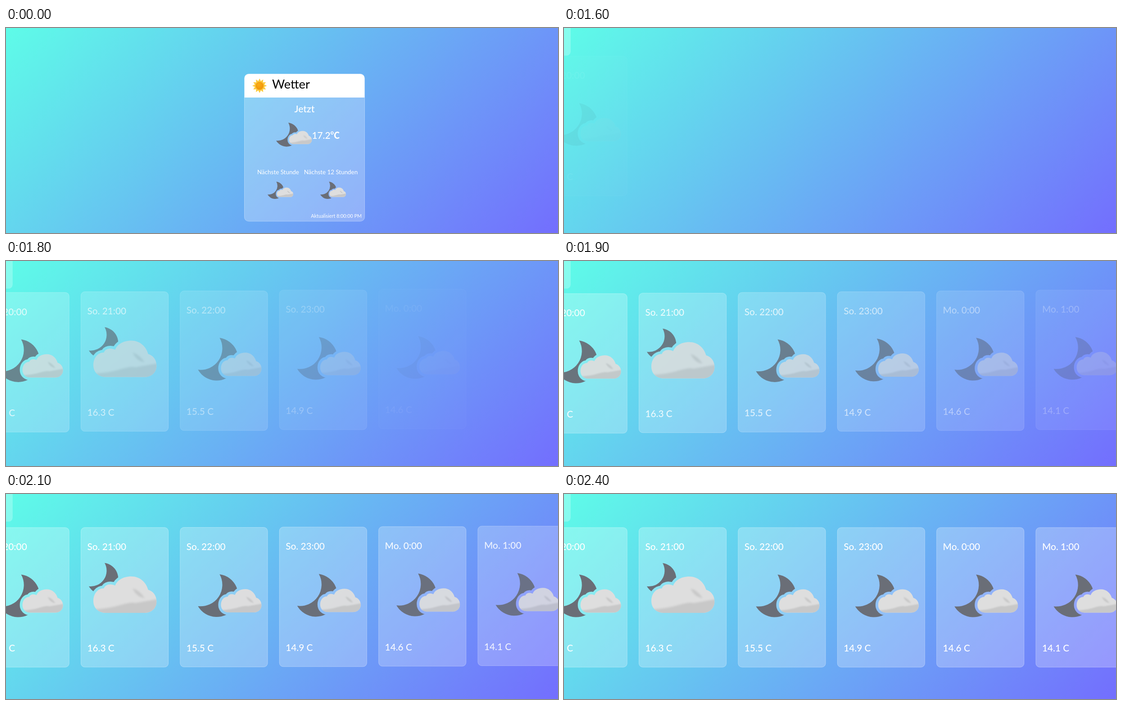
Write an HTML page that moves like this. It is 1226 px wide and 457 px high and loops after 4100 ms.

```html
<!DOCTYPE html>
<html lang="de">
<head>
<meta charset="utf-8">
<title>Wetter</title>
<style>
  html, body { margin: 0; width: 100%; height: 100%; overflow: hidden; }
  body { background: linear-gradient(135deg, #5efce8, #736efe); }
  svg { display: block; width: 1226px; height: 457px; }
  text { font-family: Lato, Carlito, sans-serif; fill: #fff; }
  .pane { fill: rgba(255, 255, 255, .25); }
  .edge { fill: none; stroke: rgba(255, 255, 255, .25); }
  .big { font-size: 20.8px; font-weight: 500; }
  .small { font-size: 13.4px; text-anchor: middle; }
  .unit { font-family: "Noto Sans CJK JP", "Noto Sans CJK SC", "Noto Sans CJK", Lato, sans-serif; font-weight: 700; }
</style>
</head>
<body>
<svg viewBox="0 0 1226 457">
  <defs>
    <path id="cloud" d="M18 52C7 52 0 45 0 35C0 25 6 17 15 17C17 11 25 10 31 13C34 5 43 0 54 0C66 0 75 8 78 19C85 21 90 27 90 36C90 45 83 52 73 52Z"/>
    <path id="moon" d="M48 0A47.8 47.8 0 1 1 0 71A48 48 0 0 0 48 0Z" fill="#6a6e77"/>
    <clipPath id="cloudClip"><use href="#cloud"/></clipPath>
    <filter id="soft" x="-20%" y="-50%" width="140%" height="200%"><feGaussianBlur stdDeviation="1.5"/></filter>
    <g id="shadedCloud">
      <use href="#cloud" fill="#dedede"/>
      <g clip-path="url(#cloudClip)">
        <g filter="url(#soft)" fill="#c8c8c8">
          <path d="M0 47Q22 46 38 41T60 38L94 32V58H0Z"/>
          <path d="M56 17Q66 20 73 31Q61 29 56 17Z"/>
        </g>
      </g>
    </g>
    <mask id="partlyGap" maskUnits="userSpaceOnUse" x="-5" y="-5" width="160" height="110">
      <rect x="-5" y="-5" width="160" height="110" fill="#fff"/>
      <use href="#cloud" x="51" y="33" stroke="#000" stroke-width="12"/>
    </mask>
    <mask id="mostlyGap" maskUnits="userSpaceOnUse" x="-5" y="-5" width="170" height="125">
      <rect x="-5" y="-5" width="170" height="125" fill="#fff"/>
      <use href="#cloud" transform="translate(10 30) scale(1.56)" stroke="#000" stroke-width="8"/>
    </mask>
    <g id="partly">
      <g mask="url(#partlyGap)"><use href="#moon"/></g>
      <use href="#shadedCloud" x="51" y="33"/>
    </g>
    <g id="mostly">
      <g mask="url(#mostlyGap)"><use href="#moon" transform="scale(.73)"/></g>
      <use href="#shadedCloud" transform="translate(10 30) scale(1.56)"/>
    </g>
    <radialGradient id="core" cx=".4" cy=".35">
      <stop offset="0" stop-color="#fbae17"/>
      <stop offset="1" stop-color="#f29a0c"/>
    </radialGradient>
  </defs>

  <g id="now">
    <rect class="pane" x="529" y="102" width="268" height="329.3" rx="10"/>
    <path d="M529.7 155V112a9.5 9.5 0 0 1 9.5-9.5H786.8a9.5 9.5 0 0 1 9.5 9.5V155Z" fill="#fff"/>
    <rect class="edge" x="529.5" y="102.5" width="267" height="328.3" rx="9.5"/>
    <g transform="translate(563.2 128.8)">
      <path id="rays" fill="#fccb3f"/>
      <circle r="8.6" fill="url(#core)" stroke="#ee9a1c" stroke-width=".6"/>
    </g>
    <text x="591" y="135.3" font-size="27.3" style="fill:#000">Wetter</text>
    <text class="big" x="663" y="188" text-anchor="middle" style="font-size:21.3px">Jetzt</text>
    <use href="#partly" transform="translate(600 211) scale(.562)"/>
    <text class="big" x="679.5" y="247">17.2<tspan class="unit">℃</tspan></text>
    <text class="small" x="604.5" y="326">Nächste Stunde</text>
    <text class="small" x="721.5" y="326">Nächste 12 Stunden</text>
    <use href="#partly" transform="translate(581 342.5) scale(.404)"/>
    <use href="#partly" transform="translate(698 342.5) scale(.404)"/>
    <text x="790" y="422.8" font-size="10.8" text-anchor="end">Aktualisiert 8:00:00 PM</text>
  </g>

  <g id="forecast">
    <rect class="pane" x="-20" y="-20" width="34.8" height="81.6" rx="9"/>
  </g>
</svg>
<script>
  const LOOP = 4100, STEP = 100, SWITCH = 1100;
  const FIRST = 1585, STAGGER = 50, FADE = 500, RISE = 12.5;
  const hours = [
    ['So. 20:00', '17.2 C', 'partly'],
    ['So. 21:00', '16.3 C', 'mostly'],
    ['So. 22:00', '15.5 C', 'partly'],
    ['So. 23:00', '14.9 C', 'partly'],
    ['Mo. 0:00', '14.6 C', 'partly'],
    ['Mo. 1:00', '14.1 C', 'partly']
  ];
  const iconAt = { partly: [40, 105], mostly: [18, 79.5] };
  const now = document.getElementById('now');
  const forecast = document.getElementById('forecast');

  // Sun rays: a twelve-pointed star
  const star = Array.from({ length: 24 }, (_, i) => {
    const a = i * Math.PI / 12, r = i % 2 ? 10.8 : 16.2;
    return (r * Math.sin(a)).toFixed(2) + ' ' + (-r * Math.cos(a)).toFixed(2);
  });
  document.getElementById('rays').setAttribute('d', 'M' + star.join('L') + 'Z');

  const cardX = i => -54.4 + 220.4 * i;
  const cardY = 74.4;

  const cards = hours.map(([time, temp, icon]) => {
    const g = document.createElementNS('http://www.w3.org/2000/svg', 'g');
    const [x, y] = iconAt[icon];
    g.innerHTML = `
      <rect class="pane" width="195" height="312" rx="9"/>
      <rect class="edge" x=".5" y=".5" width="194" height="311" rx="8.5"/>
      <text class="big" x="14.4" y="51">${time}</text>
      <use href="#${icon}" x="${x}" y="${y}"/>
      <text class="big" x="14.4" y="276.6">${temp}</text>`;
    forecast.appendChild(g);
    return g;
  });

  function draw(t) {
    now.style.display = t < SWITCH ? '' : 'none';
    forecast.style.display = t < SWITCH ? 'none' : '';
    cards.forEach((card, i) => {
      const x = Math.min(1, Math.max(0, (t - FIRST - STAGGER * i) / FADE));
      const left = 1 - Math.sin(x * Math.PI / 2);
      card.setAttribute('transform', `translate(${cardX(i)} ${cardY - RISE * left})`);
      card.setAttribute('opacity', 1 - left ** 1.6);
    });
  }

  const start = performance.now();
  function tick() {
    const t = (performance.now() - start) % LOOP;
    draw(Math.floor(t / STEP) * STEP);
    requestAnimationFrame(tick);
  }
  tick();
</script>
</body>
</html>
```
